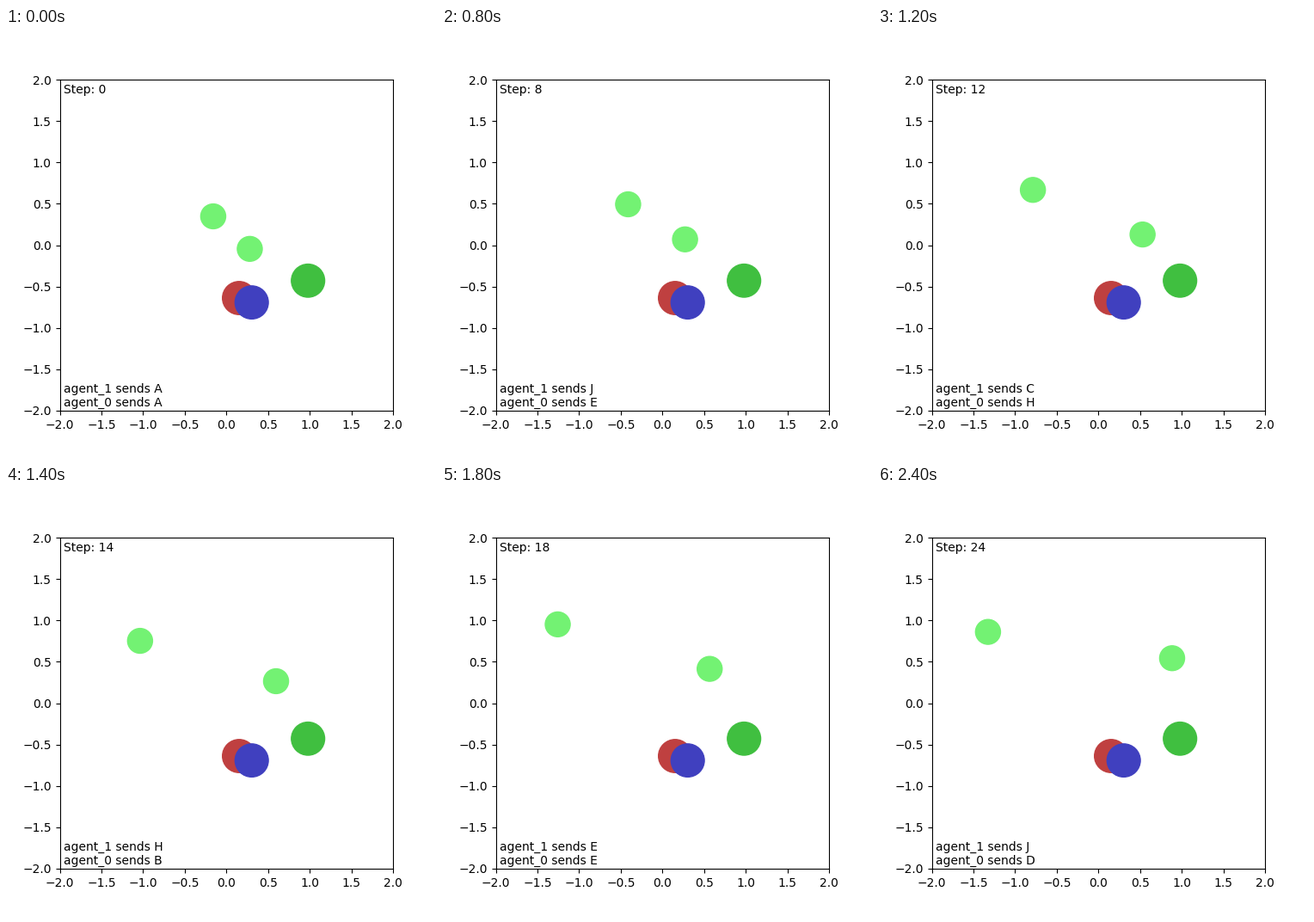
These frames come from a looping animation (500 px wide and 500 px high, 2.5 s). A matplotlib script:

```python
import numpy as np
import matplotlib.pyplot as plt
from matplotlib.animation import FuncAnimation
from matplotlib.patches import Circle

STEPS = 25
DAMPING = 0.25
KICK = 0.05  # distance one push adds in its first step

PUSH = {".": (0, 0), "L": (-1, 0), "R": (1, 0), "U": (0, 1), "D": (0, -1)}

LANDMARKS = [
    ((0.153, -0.639), (0.75, 0.25, 0.25)),
    ((0.304, -0.692), (0.25, 0.25, 0.75)),
    ((0.980, -0.429), (0.25, 0.75, 0.25)),
]
AGENT_COLOR = (0.45, 0.95, 0.45)

# start position and one push per step
AGENTS = [
    ((-0.158, 0.348), ".UD.ULLLU.LLLU.U.DURDDLL"),
    ((0.281, -0.045), ".LR.UUDDRRUUUDL.UR.DRURU"),
]

MESSAGES = {
    "agent_1": "ACHBGEADJFIBCGHADIEFBJCHJ",
    "agent_0": "AGDIFBJCEHAGHDBJCIEGAFJBD",
}


def trajectory(start, pushes):
    """Positions of a damped point mass, one row per step."""
    pos, vel = np.array(start), np.zeros(2)
    path = [pos]
    for p in pushes:
        vel = vel * (1 - DAMPING) + KICK * np.array(PUSH[p])
        pos = pos + vel
        path.append(pos)
    return np.array(path)


def disc(center, radius, color):
    return ax.add_patch(Circle(center, radius, color=color))


fig, ax = plt.subplots(figsize=(5, 5), dpi=100)
ax.set_xlim(-2, 2)
ax.set_ylim(-2, 2)

for center, color in LANDMARKS:
    disc(center, 0.2, color)

paths = [trajectory(*agent) for agent in AGENTS]
discs = [disc(path[0], 0.15, AGENT_COLOR) for path in paths]

step_label = ax.text(-1.95, 1.95, "", va="top")
labels = {
    "agent_1": ax.text(-1.95, -1.784, ""),
    "agent_0": ax.text(-1.95, -1.95, ""),
}


def update(step):
    for circle, path in zip(discs, paths):
        circle.center = path[step]
    step_label.set_text(f"Step: {step}")
    for name, label in labels.items():
        label.set_text(f"{name} sends {MESSAGES[name][step]}")
    return [*discs, step_label, *labels.values()]


anim = FuncAnimation(fig, update, frames=STEPS, interval=100, repeat=True)
plt.show()
```
